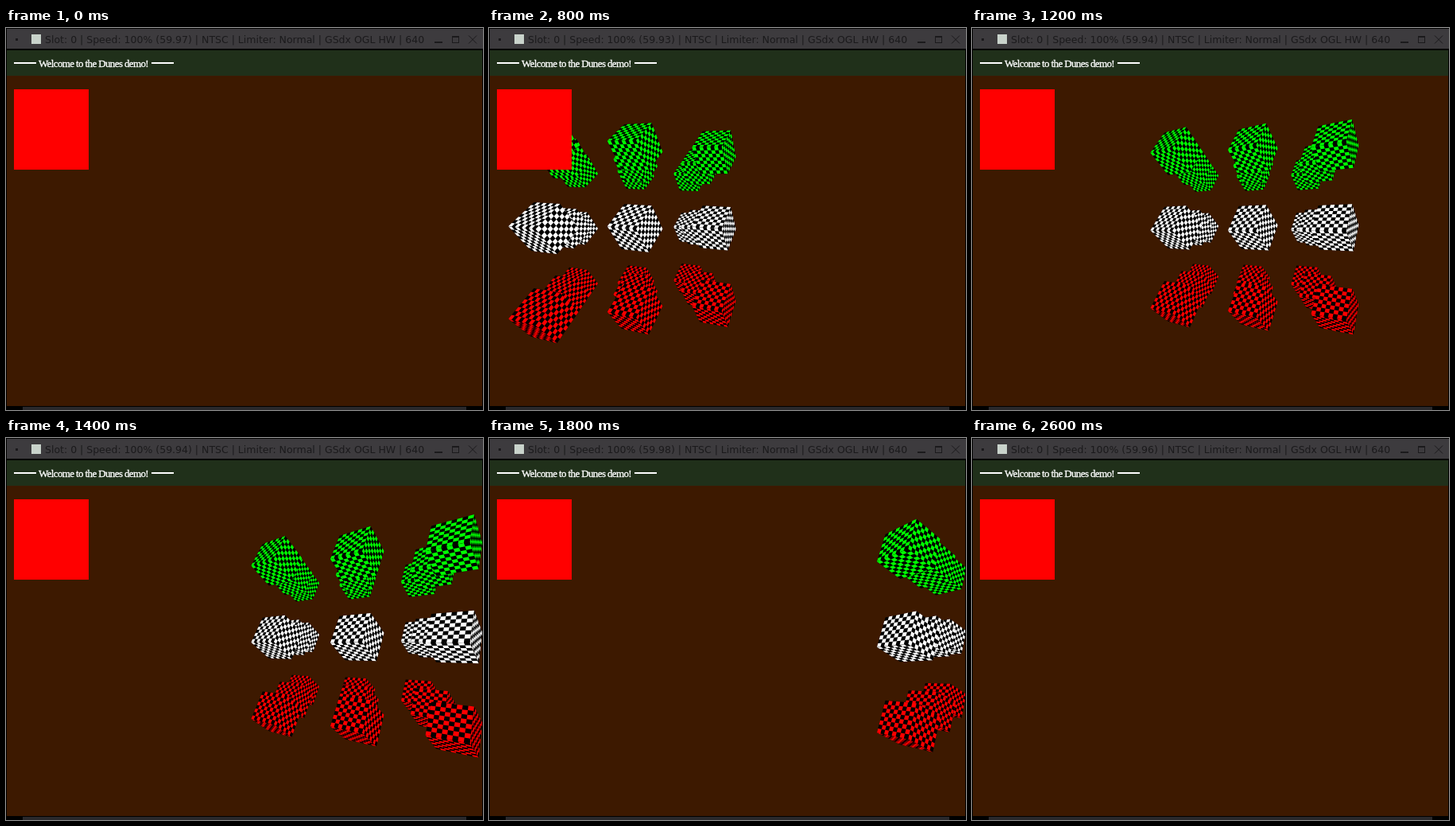
Animation, 600 px wide and 480 px high, one loop 2700 ms. Source, as an HTML page with a canvas:

```html
<!DOCTYPE html>
<html lang="en">
<head>
<meta charset="utf-8">
<title>Checkered solids</title>
<style>
html, body { margin: 0; width: 100%; height: 100%; overflow: hidden; background: #000; }
canvas { display: block; }
</style>
</head>
<body>
<canvas id="stage" width="600" height="480"></canvas>
<script>
const ctx = document.getElementById('stage').getContext('2d');
const LOOP = 2700, STEP = 100;
const FOCAL = 391, CX = 300, CY = 251;
const PAN_RATE = 0.001056, PAN_CENTER = 1070;
const SPIN_AXIS = unit([-0.446, 0.512, -0.736]), SPIN_RATE = 0.00043, SPIN_START = 1200;
const HALF = 2, GAP = 10, CELLS = 8;
const ROW_COLORS = ['#0f0', '#fff', '#f00'];

function cross(a, b) {
  return [a[1] * b[2] - a[2] * b[1], a[2] * b[0] - a[0] * b[2], a[0] * b[1] - a[1] * b[0]];
}
function dot(a, b) { return a[0] * b[0] + a[1] * b[1] + a[2] * b[2]; }
function unit(a) { const n = Math.hypot(...a); return a.map(v => v / n); }
function along(p, axis, k) { return p.map((v, i) => v + axis[i] * k); }

function spin(v, angle) {
  const c = Math.cos(angle), s = Math.sin(angle);
  const side = cross(SPIN_AXIS, v), k = dot(SPIN_AXIS, v) * (1 - c);
  return v.map((n, i) => n * c + side[i] * s + SPIN_AXIS[i] * k);
}

// Edge directions as x right, y down, z away from the viewer.
function blockAxes(t) {
  const a = unit([0.314, -0.79, -0.526]);
  const c = unit(cross([0.854, 0.025, 0.52], a));
  const b = cross(a, c);
  return [a, b, c].map(v => {
    const [x, y, z] = spin(v, (t - SPIN_START) * SPIN_RATE);
    return [x, y, -z];
  });
}

const blocks = [];
for (let x = -1; x <= 1; x++)
  for (let y = -1; y <= 1; y++)
    for (let z = 4; z <= 6; z++)
      blocks.push({ pos: [x * GAP, y * GAP, z * GAP], color: ROW_COLORS[y + 1] });
blocks.sort((p, q) => Math.hypot(...q.pos) - Math.hypot(...p.pos));

function drawFace(center, u, v, color, project) {
  const corner = (i, j) =>
    project(along(along(center, u, HALF * (2 * i / CELLS - 1)), v, HALF * (2 * j / CELLS - 1)));
  const quad = (i, j, n) => {
    ctx.moveTo(...corner(i, j));
    ctx.lineTo(...corner(i + n, j));
    ctx.lineTo(...corner(i + n, j + n));
    ctx.lineTo(...corner(i, j + n));
    ctx.closePath();
  };
  ctx.fillStyle = '#000';
  ctx.beginPath();
  quad(0, 0, CELLS);
  ctx.fill();
  ctx.fillStyle = color;
  ctx.beginPath();
  for (let i = 0; i < CELLS; i++)
    for (let j = i % 2; j < CELLS; j += 2) quad(i, j, 1);
  ctx.fill();
}

function drawBlocks(t) {
  const pan = (t - PAN_CENTER) * PAN_RATE;
  const c = Math.cos(pan), s = Math.sin(pan);
  const depth = p => p[2] * c - p[0] * s;
  const project = p => {
    const k = FOCAL / depth(p);
    return [CX + (p[0] * c + p[2] * s) * k, CY + p[1] * k];
  };
  const axes = blockAxes(t);
  for (const { pos, color } of blocks) {
    if (depth(pos) < GAP) continue;
    for (let i = 0; i < 3; i++)
      for (const side of [-1, 1]) {
        const center = along(pos, axes[i], side * HALF);
        if (dot(center, axes[i]) * side < 0)
          drawFace(center, axes[(i + 1) % 3], axes[(i + 2) % 3], color, project);
      }
  }
}

function rect(color, x, y, w, h) {
  ctx.fillStyle = color;
  ctx.fillRect(x, y, w, h);
}

function speed(t) {
  if (t < 300) return '59.97';
  if (t < 800) return '59.96';
  if (t < 1200) return '59.93';
  if (t < 1600) return '59.94';
  return t < 2000 ? '59.98' : '59.96';
}

function drawTitleBar(t) {
  const ink = '#1b1a1c';
  rect('#3d3b3e', 0, 1, 600, 25);
  rect('#000', 0, 0, 1, 480);
  rect(ink, 12, 13, 3, 3);
  rect('#c9d3cb', 32, 8, 12, 12);
  ctx.fillStyle = ink;
  ctx.font = '12.5px "DejaVu Sans", sans-serif';
  ctx.letterSpacing = '0px';
  ctx.fillText(`Slot: 0 | Speed: 100% (${speed(t)}) | NTSC | Limiter: Normal | GSdx OGL HW | 640`, 49, 18.5);
  rect(ink, 539, 17, 10, 2);
  ctx.strokeStyle = ink;
  ctx.lineWidth = 1;
  ctx.strokeRect(561.5, 10.5, 8, 8);
  rect(ink, 561, 10, 9, 2);
  ctx.beginPath();
  ctx.moveTo(582, 9.5);
  ctx.lineTo(592, 19.5);
  ctx.moveTo(592, 9.5);
  ctx.lineTo(582, 19.5);
  ctx.stroke();
}

function drawBanner() {
  const text = 'Welcome to the Dunes demo!';
  rect('#20301a', 1, 28, 598, 32);
  rect('#fff', 10, 43, 28, 2);
  rect('#fff', 183, 43, 28, 2);
  ctx.font = '13px "Liberation Serif", "Times New Roman", serif';
  ctx.letterSpacing = '-0.62px';
  ctx.fillStyle = ctx.strokeStyle = '#fff';
  ctx.lineWidth = 0.3;
  ctx.fillText(text, 41, 49);
  ctx.strokeText(text, 41, 49);
}

function draw(t) {
  rect('#000', 0, 0, 600, 480);
  rect('#3d1900', 1, 60, 598, 415);
  ctx.save();
  ctx.beginPath();
  ctx.rect(1, 60, 598, 415);
  ctx.clip();
  drawBlocks(t);
  ctx.restore();
  rect('#f00', 10, 77, 94, 101);
  drawTitleBar(t);
  drawBanner();
  rect('#29282b', 21, 476, 558, 4);
}

let shown = -1;
function tick() {
  const t = Math.floor(performance.now() % LOOP / STEP) * STEP;
  if (t !== shown) draw(shown = t);
  requestAnimationFrame(tick);
}
tick();
</script>
</body>
</html>
```
